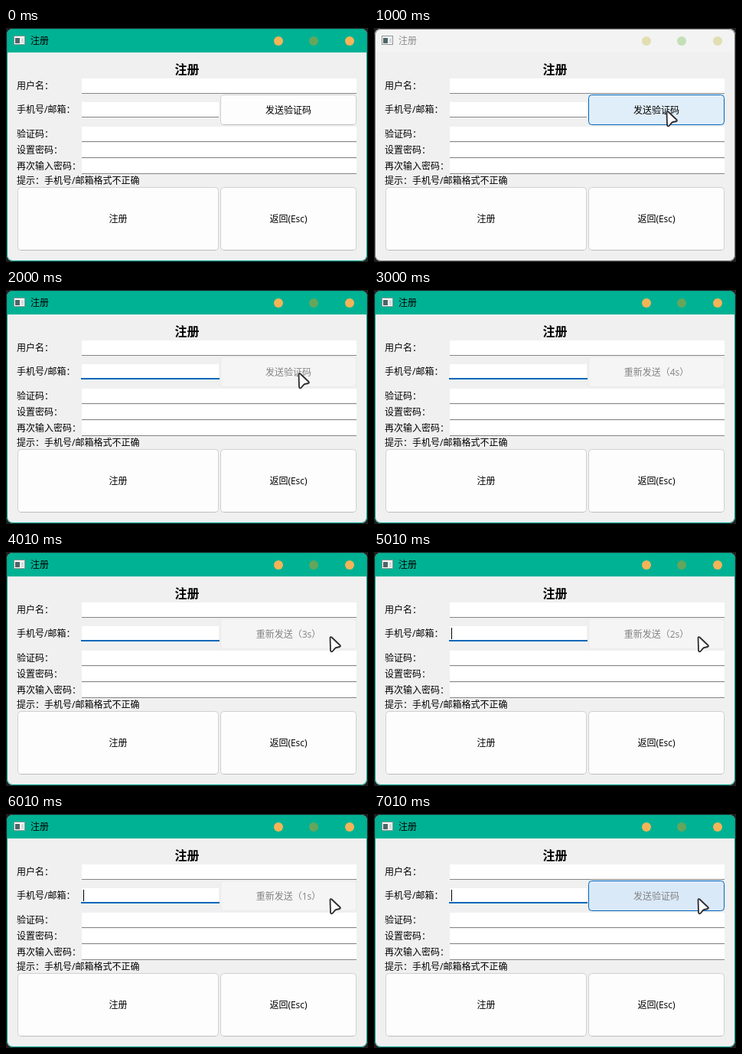
These frames come from a looping animation (473x306 px, 8 s). An HTML page:

```html
<!DOCTYPE html>
<html lang="zh-CN">
<head>
<meta charset="utf-8">
<title>注册</title>
<style>
  html, body { margin: 0; width: 100%; height: 100%; overflow: hidden; background: #202020; }
  svg { display: block; width: 473px; height: 306px; }
  text { font: 12px "Open Sans", "Noto Sans CJK SC", "Noto Sans CJK", sans-serif; fill: #000; }
  .mid { text-anchor: middle; }
  .heading { font-size: 16px; font-weight: 700; }
  .bar { fill: #00b294; }
  .frame { fill: none; stroke: #00a088; }
  .amber { fill: #f5b458; }
  .green { fill: #64a65c; }
  .inactive .bar { fill: #f3f3f3; }
  .inactive .frame { stroke: #777; }
  .inactive .caption { fill: #8c8c8c; }
  .inactive .amber { fill: #e2deb2; }
  .inactive .green { fill: #c3dfb7; }
  .input { fill: #fff; }
  .rule { fill: #868686; }
  .button { fill: #fdfdfd; stroke: #d0d0d0; }
  #send.hover .button { fill: #e0eef9; stroke: #0067c0; }
  #send.disabled .button { fill: #f5f5f5; stroke: #eaeaea; }
  #send.fading .button { fill: #dae9f8; stroke: #0067c0; }
  #send.disabled text, #send.fading text { fill: #838383; }
  #send.disabled .edge, #send.hover .edge, #send.fading .edge { display: none; }
  .edge { stroke: #bcbcbc; }
</style>
</head>
<body>
<svg id="stage" viewBox="0 0 473 306">
  <clipPath id="round"><rect x="1" y="1" width="471" height="304" rx="8"/></clipPath>
  <g clip-path="url(#round)">
    <rect width="473" height="306" fill="#f0f0f0"/>
    <rect class="bar" width="473" height="32"/>
  </g>
  <rect class="frame" x="1.5" y="1.5" width="470" height="303" rx="7.5"/>

  <rect x="10.5" y="10.5" width="14" height="11" fill="#f8f8f8" stroke="#8c9494"/>
  <rect x="12" y="13" width="6" height="7" fill="#4d6668"/>
  <path d="M20 14.5h3M20 16.5h3M20 18.5h3" stroke="#b4baba"/>
  <text class="caption" x="32" y="20.5">注册</text>
  <circle class="amber" cx="356" cy="17" r="6"/>
  <circle class="green" cx="402" cy="17" r="6"/>
  <circle class="amber" cx="449" cy="17" r="6"/>

  <text class="heading mid" x="236.5" y="60">注册</text>
  <g id="form"></g>
  <text x="14" y="204">提示：手机号/邮箱格式不正确</text>

  <rect id="focus" x="98" y="115" width="181" height="2" fill="#0067b8"/>
  <rect id="caret" x="101" y="99" width="1" height="15"/>
  <g id="buttons"></g>
  <path id="pointer" fill="#fff" stroke="#2b2b30" stroke-width="1.8" stroke-linejoin="round"
    d="M1.5 2L2 18.5Q2.5 21 4.5 20L8 15.8Q9 14.8 14 14Q15.5 13.5 14.5 12L3.5 1.5Q2 .5 1.5 2Z"/>
</svg>
<script>
const $ = id => document.getElementById(id);

const field = (label, top, width = 359) => `
  <text x="14" y="${top + 14}">${label}</text>
  <rect class="input" x="99" y="${top}" width="${width}" height="20"/>
  <rect class="rule" x="99" y="${top + 19}" width="${width}" height="1"/>`;

const button = (id, label, x, y, w, h) => `
  <g id="${id}">
    <rect class="button" x="${x + .5}" y="${y + .5}" width="${w - 1}" height="${h - 1}" rx="4"/>
    <path class="edge" d="M${x + 4} ${y + h - .5}h${w - 8}"/>
    <text class="mid" x="${x + w / 2}" y="${y + h / 2 + 4.5}">${label}</text>
  </g>`;

$('form').innerHTML =
  field('用户名：', 66) + field('手机号/邮箱：', 97, 179) + field('验证码：', 129) +
  field('设置密码：', 150) + field('再次输入密码：', 171);

$('buttons').innerHTML =
  button('send', '发送验证码', 280, 87, 178, 40) +
  button('register', '注册', 15, 208, 263, 83) +
  button('back', '返回(Esc)', 280, 208, 178, 83);

const sendLabel = document.querySelector('#send text');
const resend = seconds => `重新发送（${seconds}s）`;
const near = [381, 108], far = [422, 110];

const steps = [
  { at: 0 },
  { at: 1000, inactive: true, state: 'hover', pointer: near },
  { at: 2000, state: 'disabled', focus: true, pointer: near },
  { at: 3000, state: 'disabled', focus: true, label: resend(4) },
  { at: 4010, state: 'disabled', focus: true, label: resend(3), pointer: far },
  { at: 5010, state: 'disabled', focus: true, label: resend(2), pointer: far, caret: true },
  { at: 6010, state: 'disabled', focus: true, label: resend(1), pointer: far, caret: true },
  { at: 7010, state: 'fading', focus: true, pointer: far, caret: true }
];

const show = (id, on) => $(id).setAttribute('visibility', on ? 'visible' : 'hidden');

function apply(step) {
  $('stage').classList.toggle('inactive', !!step.inactive);
  $('send').setAttribute('class', step.state || '');
  sendLabel.textContent = step.label || '发送验证码';
  show('focus', step.focus);
  show('caret', step.caret);
  show('pointer', step.pointer);
  if (step.pointer) $('pointer').setAttribute('transform', `translate(${step.pointer})`);
}

let current;
function frame() {
  const time = performance.now() % 8000;
  const step = steps.findLast(s => s.at <= time);
  if (step !== current) apply(current = step);
  requestAnimationFrame(frame);
}
frame();
</script>
</body>
</html>
```
